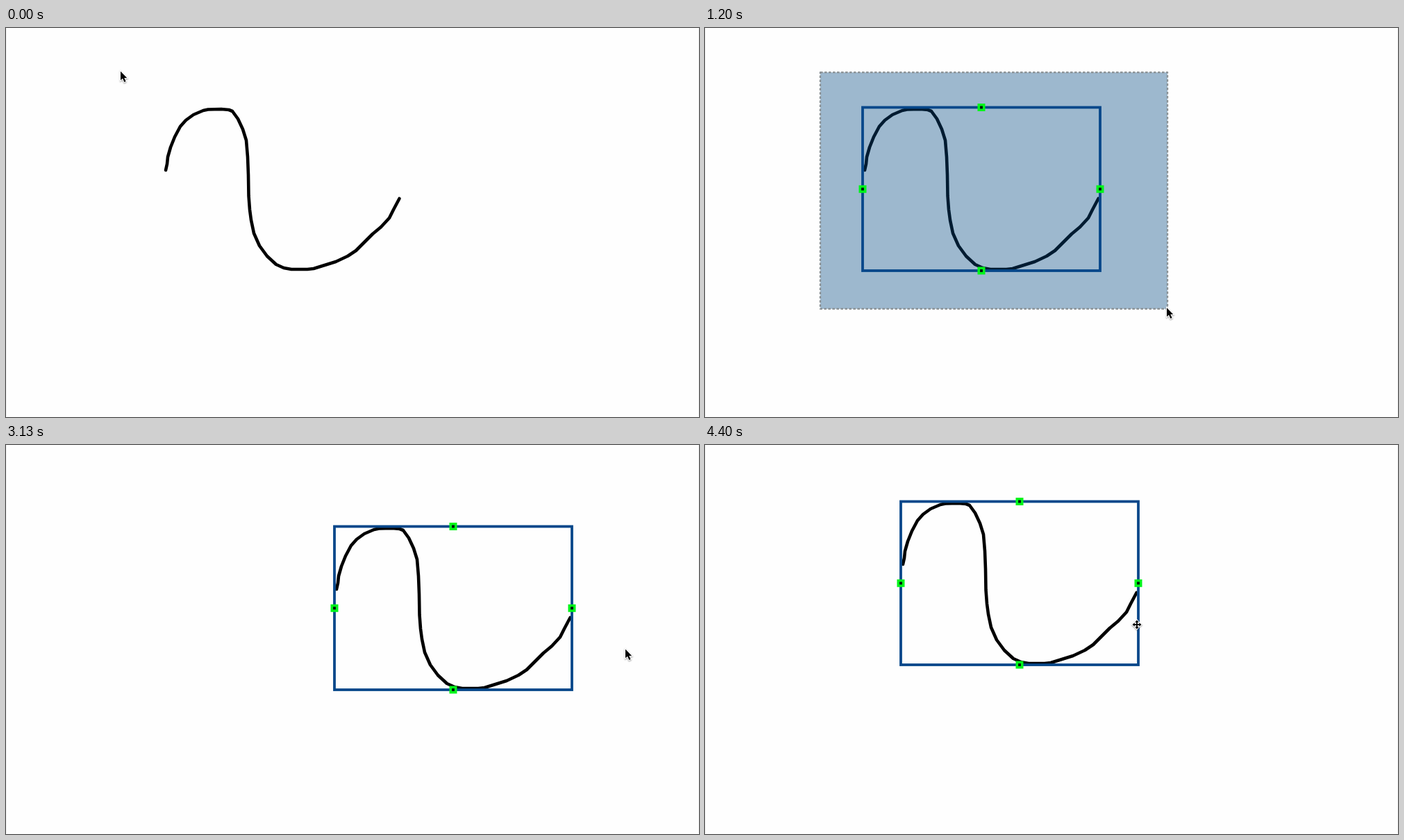
Recreate the animation shown at these times as an HTML page with a canvas. Size 998 px wide and 561 px high, loop 4670 ms.

```html
<!DOCTYPE html>
<html lang="en">
<head>
<meta charset="utf-8">
<title>Select and drag a stroke</title>
<style>
html, body { margin: 0; width: 100%; height: 100%; overflow: hidden; background: #fefefe; }
canvas { display: block; }
</style>
</head>
<body>
<canvas id="stage" width="998" height="561"></canvas>
<script>
const ctx = document.getElementById('stage').getContext('2d');
const LOOP = 4670, STEPS_PER_MS = 15 / 1000;
const START = [166, 64], GRAB = [567, 292];
const SELECT_END = 19, OUTLINE_START = 8, HOVER_START = 30, DRAG_START = 39;

// Pointer keys: [step, x, y]
const selectPath = [
  [0, 166, 64], [2, 170, 68], [4, 190, 84], [5, 208, 100], [6, 235, 121], [7, 275, 150],
  [8, 325, 187], [11, 504, 310], [12, 564.5, 343], [13, 608, 367], [14, 636, 384],
  [15, 653, 395], [16, 661, 401], [17, 666, 405], [19, 666, 405]
];
const approachPath = [
  [20, 655, 392], [21, 630, 362], [22, 600, 326], [23, 580, 303], [24, 569, 291],
  [25, 565, 290], [26, 564, 291], [27, 564, 291], [30, 567, 292], [38, 567, 292]
];
const dragPath = [
  [39, 569, 292], [41, 592, 292], [43, 647, 293], [44, 692, 293], [45, 748, 294],
  [46, 813, 295], [47, 893, 296], [48, 932, 298], [49, 947, 302], [51, 954, 314],
  [53, 950, 340], [54, 935, 370], [55, 900, 398], [56, 850, 418], [57, 790, 415],
  [58, 736, 397], [59, 702, 381.5], [60, 667, 352], [61, 637, 325], [62, 627, 297],
  [63, 623, 274], [64, 622, 262], [65, 622, 259], [70, 622, 259]
];
const pointerPath = [...selectPath, ...approachPath, ...dragPath];

const stroke = new Path2D('M230 205 232 196 233 186 237 172 243 157 251 142 259 133 270 125 ' +
  '284 119 291 117.5 310 117 321 118 326 120 334 131 341 146 346 162 348 186 349 212 349.5 242 ' +
  '351 262 353 277 357 296 365 314 376 329 389 341 400 346 411 348 434 348 443 347 475 337 ' +
  '492 329 504 321 528 297 540 287 552 274 558 262 566.5 246');
const arrow = new Path2D('M-1-1.5V11.3L2 8.7 4.4 14.1 6.6 13.1 4.3 7.9H8.2Z');
const moveArrows = new Path2D('M0-6.5 2.8-3.3H.9V-.9H3.3V-2.8L6.5 0 3.3 2.8V.9H.9V3.3H2.8L0 6.5 ' +
  '-2.8 3.3H-.9V.9H-3.3V2.8L-6.5 0-3.3-2.8V-.9H-.9V-3.3H-2.8Z');

function pointerAt(step) {
  const i = Math.max(1, pointerPath.findIndex(key => key[0] >= step));
  const [s0, x0, y0] = pointerPath[i - 1], [s1, x1, y1] = pointerPath[i];
  const k = (step - s0) / (s1 - s0);
  return [x0 + (x1 - x0) * k, y0 + (y1 - y0) * k];
}

function square(x, y, size, color) {
  ctx.fillStyle = color;
  ctx.fillRect(x - size / 2, y - size / 2, size, size);
}

function drawStroke() {
  ctx.lineWidth = 4.6;
  ctx.lineCap = ctx.lineJoin = 'round';
  ctx.strokeStyle = '#000';
  ctx.stroke(stroke);
}

function drawSelection([x, y]) {
  const box = [...START, x - START[0], y - START[1]];
  ctx.fillStyle = 'rgba(0,70,128,.385)';
  ctx.fillRect(...box);
  ctx.save();
  ctx.lineCap = 'butt';
  ctx.lineWidth = 2.4;
  ctx.strokeStyle = '#8b9296';
  ctx.setLineDash([3.6, 2.4]);
  ctx.strokeRect(...box);
  ctx.restore();
}

function drawOutline() {
  ctx.lineJoin = 'miter';
  ctx.lineWidth = 3.8;
  ctx.strokeStyle = '#06478a';
  ctx.strokeRect(227, 114.5, 342, 235.5);
  for (const [x, y] of [[398, 114.5], [569, 232.3], [398, 350], [227, 232.3]]) {
    square(x, y, 11, '#00f51a');
    square(x, y, 4, '#001a08');
  }
}

function drawPointer([x, y], shape) {
  ctx.save();
  ctx.translate(x, y);
  ctx.lineJoin = 'miter';
  ctx.lineWidth = 2;
  ctx.strokeStyle = '#fff';
  ctx.shadowColor = 'rgba(0,0,0,.4)';
  ctx.shadowBlur = 2;
  ctx.shadowOffsetY = 1;
  ctx.stroke(shape);
  ctx.shadowColor = 'transparent';
  ctx.fillStyle = '#000';
  ctx.fill(shape);
  ctx.restore();
}

function draw(step) {
  const pointer = pointerAt(step);
  const trailing = pointerAt(Math.max(0, step - 1)); // the app reacts one step late
  const lag = Math.hypot(pointer[0] - trailing[0], pointer[1] - trailing[1]);

  ctx.fillStyle = '#fefefe';
  ctx.fillRect(0, 0, 998, 561);
  ctx.fillStyle = '#f1f1f1';
  ctx.fillRect(0, 0, 1, 560);
  ctx.fillRect(997, 0, 1, 560);

  ctx.save();
  if (step >= DRAG_START) ctx.translate(trailing[0] - GRAB[0], trailing[1] - GRAB[1]);
  drawStroke();
  if (step > 0 && step < SELECT_END) drawSelection(trailing);
  if (step >= OUTLINE_START) drawOutline();
  ctx.restore();

  drawPointer(pointer, step >= HOVER_START && lag < 6 ? moveArrows : arrow);
}

function tick() {
  const t = performance.now() % LOOP;
  draw(Math.floor(t * STEPS_PER_MS + 0.06));
  requestAnimationFrame(tick);
}
tick();
</script>
</body>
</html>
```
